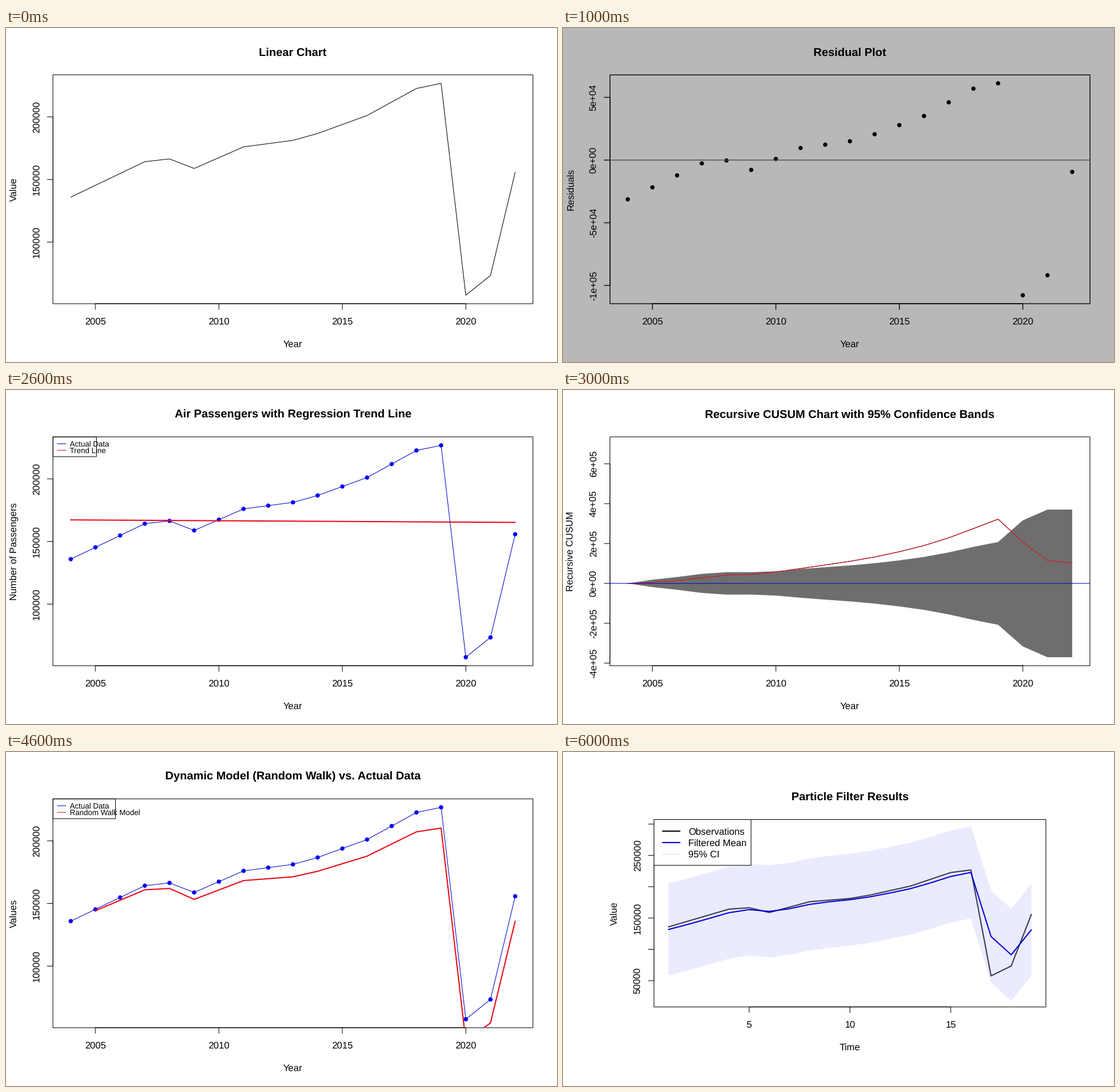
Recreate the animation shown at these times as a matplotlib script. Size 924 by 561 pixels, loop 7 s.

```python
import matplotlib.pyplot as plt
import numpy as np
from matplotlib.animation import ArtistAnimation
from matplotlib.patches import Circle, Polygon, Rectangle

W, H = 924, 561
LINE = 19.2  # height of one margin line
FULL = (4.1 * LINE, 4.1 * LINE, W - 2.1 * LINE, H - 5.1 * LINE)
INSET = (152.6, 113.5, 809.8, 428.2)
RED, BLUE, DOT_BLUE, ROSE = "#e80a18", "#0000cc", "#0000f4", "#d0405a"

plt.rcParams["font.family"] = "Liberation Sans"
plt.rcParams["text.hinting"] = "none"
fig = plt.figure(figsize=(W / 72, H / 72), dpi=72, facecolor="white")
ax = fig.add_axes([0, 0, 1, 1])
ax.set(xlim=(0, W), ylim=(H, 0))
ax.axis("off")


def padded(values):
    """Data range widened by 4 % at each end."""
    low, high = np.min(values), np.max(values)
    pad = 0.04 * (high - low)
    return low - pad, high + pad


def through(x, keys):
    """Straight segments through a few (x, y) key points."""
    return np.interp(x, *zip(*keys))


class Panel:
    """One chart, drawn in stage pixels with the y axis pointing down."""

    def __init__(self, xs, ys, edges=FULL, lw=1.0):
        self.left, self.top, self.right, self.bottom = edges
        self.xlim, self.ylim = padded(xs), padded(ys)
        self.lw = lw
        self.items = []

    def px(self, x):
        a, b = self.xlim
        return self.left + (np.asarray(x) - a) / (b - a) * (self.right - self.left)

    def py(self, y):
        a, b = self.ylim
        return self.bottom - (np.asarray(y) - a) / (b - a) * (self.bottom - self.top)

    def keep(self, artist, clip=False):
        artist.set_zorder(len(self.items) + 1)
        if clip:
            artist.set_clip_path(Rectangle(
                (self.left, self.top), self.right - self.left,
                self.bottom - self.top, transform=ax.transData))
        self.items.append(artist)

    def stroke(self, x, y, color="black", lw=1.0, clip=False, **style):
        style = dict(solid_capstyle="round", solid_joinstyle="round",
                     dash_capstyle="butt", snap=False) | style
        self.keep(ax.plot(x, y, color=color, lw=lw, **style)[0], clip)

    def dots(self, xs, ys, color="black", size=7.2):
        for center in zip(xs, ys):
            self.keep(ax.add_patch(Circle(center, size / 2, fc=color, lw=0)))

    def curve(self, x, y, color="black", lw=1.0, **style):
        self.stroke(self.px(x), self.py(y), color, lw, clip=True, **style)

    def points(self, x, y, color="black", size=7.2):
        self.dots(self.px(x), self.py(y), color, size)

    def level(self, y, color, lw=1.0):
        self.stroke([self.left, self.right], [self.py(y)] * 2, color, lw,
                    solid_capstyle="butt")

    def band(self, x, low, high, color):
        xs = np.concatenate([x, x[::-1]])
        ys = np.concatenate([low, high[::-1]])
        shape = Polygon(np.column_stack([self.px(xs), self.py(ys)]),
                        fc=color, lw=0)
        self.keep(ax.add_patch(shape), clip=True)

    def rect(self, x0, y0, x1, y1, fill="none", lw=1.0):
        self.keep(ax.add_patch(Rectangle(
            (x0, y0), x1 - x0, y1 - y0, fc=fill, ec="black", lw=lw, snap=False)))

    def backdrop(self, color):
        self.keep(ax.add_patch(Rectangle((0, 0), W, H, fc=color, lw=0)))

    def label(self, x, y, text, size=16, ha="center", clip=False, **style):
        self.keep(ax.text(x, y, text, size=size, ha=ha, va="baseline",
                          rotation_mode="anchor", clip_on=clip, **style), clip)

    def frame(self, xticks, yticks, title="", xlabel="", ylabel="",
              fmt="{:.0f}", label_every=1):
        mid_x = (self.left + self.right) / 2
        mid_y = (self.top + self.bottom) / 2
        tick = LINE / 2
        self.rect(self.left, self.top, self.right, self.bottom, lw=self.lw)

        xs, ys = self.px(xticks), self.py(yticks)
        self.stroke([xs[0], xs[-1]], [self.bottom] * 2, lw=self.lw)
        for x, value in zip(xs, xticks):
            self.stroke([x, x], [self.bottom, self.bottom + tick], lw=self.lw)
            self.label(x, self.bottom + 1.8 * LINE, str(value))

        self.stroke([self.left] * 2, [ys[0], ys[-1]], lw=self.lw)
        for i, (y, value) in enumerate(zip(ys, yticks)):
            self.stroke([self.left - tick, self.left], [y, y], lw=self.lw)
            if i % label_every == 0:
                self.label(self.left - 1.2 * LINE, y, fmt.format(value), rotation=90)

        self.label(mid_x, self.top - 32.4, title, 19.2, weight="bold")
        self.label(mid_x, self.bottom + 3.8 * LINE, xlabel)
        self.label(self.left - 3.2 * LINE, mid_y, ylabel, rotation=90)

    def small_legend(self, right, *entries):
        self.rect(self.left, self.top, right, 112)
        for i, (text, color) in enumerate(entries):
            y = 90.3 + 11 * i
            self.stroke([86, 100.6], [y, y], color)
            self.label(107, y + 4.6, text, 12.8, ha="left")


years = np.arange(2004, 2023)
year_ticks = range(2005, 2021, 5)
value_ticks = range(100000, 200001, 50000)
value = 1000 * through(years, [
    (2004, 135.9), (2007, 164.2), (2008, 166.4), (2009, 158.8), (2011, 176.0),
    (2013, 181.2), (2014, 186.7), (2016, 201.0), (2018, 222.6), (2019, 226.7),
    (2020, 57.65), (2021, 73.45), (2022, 155.75)])
count = np.arange(1, len(value) + 1)
trend = np.polyval(np.polyfit(years - 2013, value, 1), years - 2013)


def linear_chart():
    p = Panel(years, value)
    p.curve(years, value)
    p.frame(year_ticks, value_ticks, "Linear Chart", "Year", "Value")
    return p.items


def residual_plot():
    rest = value - trend
    p = Panel(years, rest, lw=1.3)
    p.backdrop("#b8b8b8")
    p.points(years, rest)
    p.frame(year_ticks, range(-100000, 50001, 50000), "Residual Plot",
            "Year", "Residuals", "{:.0e}")
    p.level(0, "#505050", 1.4)
    return p.items


def actual_data_panel(title, ylabel):
    p = Panel(years, value)
    p.curve(years, value, BLUE)
    p.points(years, value, DOT_BLUE)
    p.frame(year_ticks, value_ticks, title, "Year", ylabel)
    return p


def trend_chart():
    p = actual_data_panel("Air Passengers with Regression Trend Line",
                          "Number of Passengers")
    p.curve(years, trend, RED, 2)
    p.small_legend(151.6, ("Actual Data", BLUE), ("Trend Line", RED))
    return p.items


def random_walk_chart():
    drift = np.mean(np.diff(value))
    walk = value - drift * (count - 1)
    p = actual_data_panel("Dynamic Model (Random Walk) vs. Actual Data", "Values")
    p.curve(years[1:], walk[1:], RED, 2)
    p.small_legend(183.6, ("Actual Data", BLUE), ("Random Walk Model", RED))
    return p.items


def cusum_chart():
    mean = np.cumsum(value) / count
    cusum = np.cumsum(value - mean)
    spread = np.array([0] + [np.std(value[:n], ddof=1) for n in count[1:]])
    bound = 1.96 * spread * np.sqrt(count)
    p = Panel(years, [-bound.max(), cusum.max() + bound.max()])
    p.curve(years, cusum)
    p.frame(year_ticks, range(-400000, 600001, 200000),
            "Recursive CUSUM Chart with 95% Confidence Bands",
            "Year", "Recursive CUSUM", "{:.0e}")
    p.band(years, -bound, bound, "#6e6e6e")
    p.curve(years, cusum, RED)
    p.level(0, BLUE)
    return p.items


def filter_comparison():
    steps = np.arange(1, 31)
    kalman = through(steps, [
        (1, .374), (2, .11), (3, -1.64), (5, -2.68), (7, -4.44), (9, -5.54),
        (10, -5.73), (11, -5.30), (13, -5.27), (14, -6.29), (16, -5.66),
        (20, -4.10), (21, -3.00), (22, -3.12), (23, -2.79), (24, -3.67),
        (27, -5.00), (28, -6.14), (29, -6.52), (30, -6.34)])
    # The bootstrap mean settles near a rest level and echoes each move weakly.
    rest, hold, echo = -.15, .85, .1
    boot = [.374, .02, -.99]
    for move in np.diff(kalman)[2:]:
        boot.append(rest + hold * (boot[-1] - rest) + echo * move)

    p = Panel(steps, kalman)
    p.frame(range(0, 31, 5), range(-6, 1),
            ylabel="cbind(res.BF\\$m, res.Kalman\\$m)")
    series = [("Bootstrap Filter", boot, "black", "-"),
              ("Kalman Filter", kalman, ROSE, (0, (5.33, 5.33)))]
    for _, data, color, style in series:
        p.curve(steps, data, color, ls=style)
        p.points(steps, data, color, 5.9)
    p.rect(783.3, p.top, p.right, 120.6)
    for i, (name, _, color, style) in enumerate(series):
        y = 92.9 + 14.2 * i
        p.stroke([785.4, 804], [y, y], color, ls=style)
        p.dots([794.7], [y], color, 5.9)
        p.label(812.2, y + 5.8, name, ha="left", clip=True)
    return p.items


def particle_chart():
    gain, half_width = .62, 73400
    mean = [131700]
    for v in value[1:]:
        mean.append(mean[-1] + gain * (v - mean[-1]))
    mean = np.array(mean)
    pale, blue = "#ebebff", "#0000d8"
    p = Panel(count, [19100, 296100], INSET)
    p.band(count, mean - half_width, mean + half_width, pale)
    p.curve(count, value, "#3b3750", 2)
    p.curve(count, mean, blue, 2)
    p.frame(range(5, 16, 5), range(50000, 300001, 50000),
            "Particle Filter Results", "Time", "Value", label_every=2)
    p.rect(p.left, p.top, 315.3, 190.3, fill="white")
    entries = [("Observations", "black"), ("Filtered Mean", blue), ("95% CI", pale)]
    for i, (text, color) in enumerate(entries):
        y = 132.9 + LINE * i
        p.stroke([167, 196], [y, y], color, 2)
        p.label(210, y + 5.8, text, ha="left")
    return p.items


scenes = [linear_chart(), residual_plot(), trend_chart(), cusum_chart(),
          random_walk_chart(), filter_comparison(), particle_chart()]
anim = ArtistAnimation(fig, scenes, interval=1000, repeat=True, repeat_delay=0)
plt.show()
```
